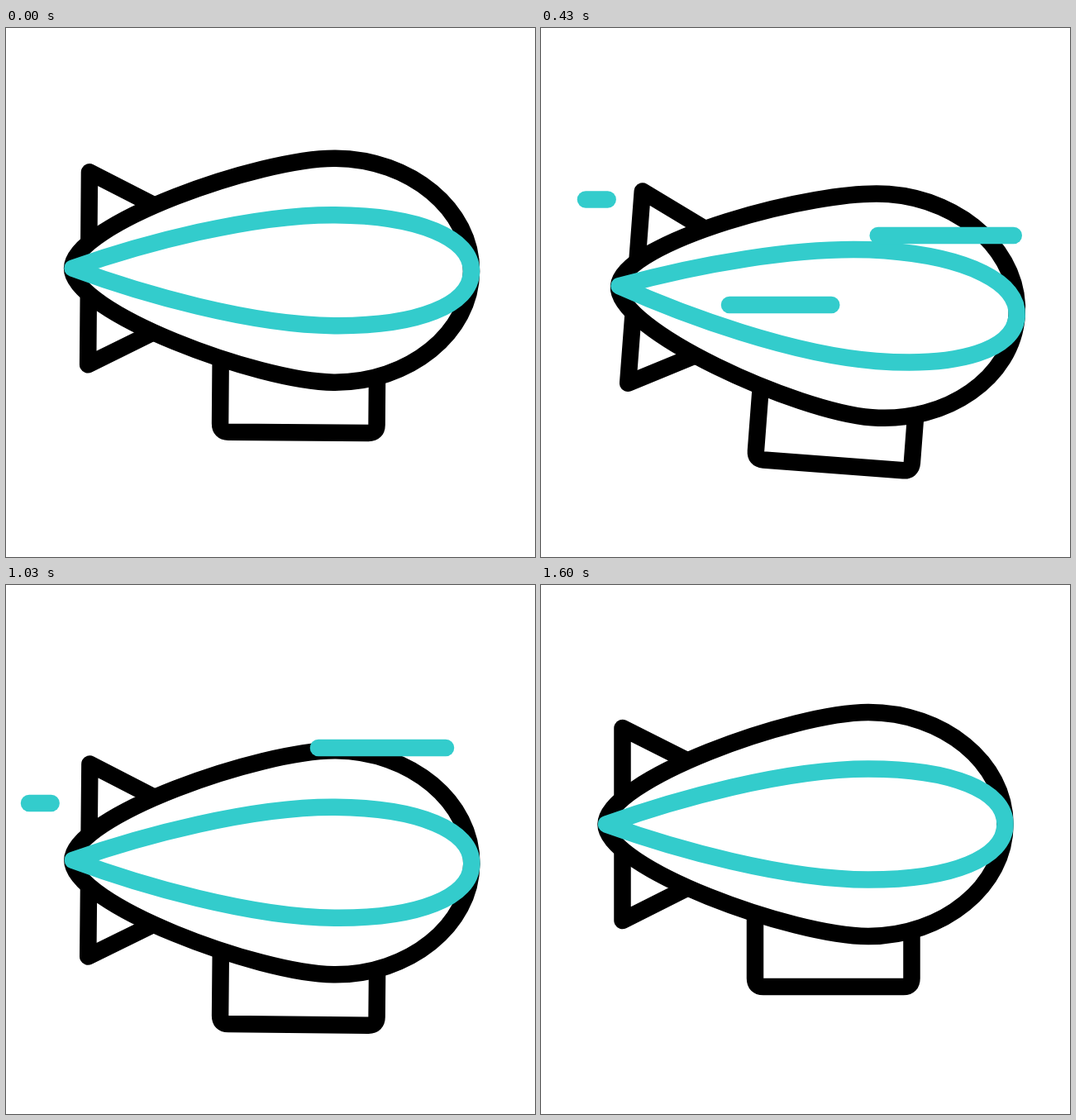
An HTML page with a canvas that plays this animation: 640 px wide and 640 px high, repeating every 1.67 s.

```html
<!DOCTYPE html>
<html lang="en">
<head>
<meta charset="utf-8">
<title>Airship</title>
<style>
  html, body { margin: 0; width: 100%; height: 100%; overflow: hidden; background: #fff; }
  canvas { display: block; width: 640px; height: 640px; }
</style>
</head>
<body>
<canvas id="stage" width="640" height="640"></canvas>
<script>
const ctx = document.getElementById('stage').getContext('2d');
const BLACK = '#000', TEAL = '#33cccc';
const LOOP = 1670, STEP = 1000 / 30, LAST_STEP = 48;
const PIVOT = { x: 320, y: 486 };

const hull = new Path2D(`M396 154 C487 154 561.5 215 561.5 289.5 S487 425 396 425
  C305 425 78.5 342.5 78.5 289.5 S305 154 396 154Z`);
const stripe = new Path2D(`M79 289.5 C162 259.5 295 222.5 396 222.5 C498 222.5 561.5 249 561.5 289.5
  S498 356.5 396 356.5 C295 356.5 162 319.5 79 289.5Z`);
const frame = new Path2D(`M176 212 L98.5 173 V262 M176 367 L98.5 406 V317
  M259 396 V476 Q259 486 269 486 H438.5 Q448.5 486 448.5 476 V418`);

// Keys are [step, value], eased between neighbours.
const lift = [[-1.3, 0], [8.4, 62.2], [21.2, -12], [32, 47], [44.7, 0]];
const tilt = [[-1.8, 0], [9.2, 6.3], [10, 6.3], [21.3, -5], [35.5, 2.25], [48, 0]];

// Wind streaks run leftwards over 200 px.
const streaks = [
  { y: 207.5, right: 254, start: 0.8 },
  { y: 335, right: 428, start: 3.7 },
  { y: 251, right: 589, start: 5.7 },
  { y: 343, right: 561, start: 16.7 },
  { y: 264, right: 228, start: 18.8 },
  { y: 197, right: 574, start: 22.75 }
];
const LENGTH = 200, HEAD_TIME = 9, TAIL_DELAY = 5.8, TAIL_TIME = 8.3;

function ease(x) {
  const p = Math.min(1, Math.max(0, x));
  return p * p * (3 - 2 * p);
}

function valueAt(keys, step) {
  let value = keys[0][1];
  for (let i = 1; i < keys.length; i++) {
    const [from, a] = keys[i - 1], [to, b] = keys[i];
    if (step >= from) value = a + (b - a) * ease((step - from) / (to - from));
  }
  return value;
}

function stroke(path, color) {
  ctx.strokeStyle = color;
  ctx.stroke(path);
}

function drawAirship(step) {
  ctx.save();
  ctx.translate(PIVOT.x, PIVOT.y + valueAt(lift, step));
  ctx.rotate(valueAt(tilt, step) * Math.PI / 180);
  ctx.translate(-PIVOT.x, -PIVOT.y);
  ctx.lineCap = 'butt';
  stroke(frame, BLACK);
  stroke(hull, BLACK);
  stroke(stripe, TEAL);
  ctx.restore();
}

function drawStreak({ y, right, start }, step) {
  const age = step - start;
  if (age <= 0 || age >= TAIL_DELAY + TAIL_TIME) return;
  const line = new Path2D();
  line.moveTo(right - LENGTH * ease((age - TAIL_DELAY) / TAIL_TIME), y);
  line.lineTo(right - LENGTH * ease(age / HEAD_TIME), y);
  ctx.lineCap = 'round';
  stroke(line, TEAL);
}

function render(now) {
  const step = Math.min(LAST_STEP, Math.floor((now % LOOP + 3.4) / STEP));
  ctx.fillStyle = '#fff';
  ctx.fillRect(0, 0, 640, 640);
  ctx.lineWidth = 20.5;
  ctx.lineJoin = 'round';
  drawAirship(step);
  streaks.forEach(streak => drawStreak(streak, step));
}

const origin = performance.now();
function tick() {
  render(performance.now() - origin);
  requestAnimationFrame(tick);
}
tick();
</script>
</body>
</html>
```
